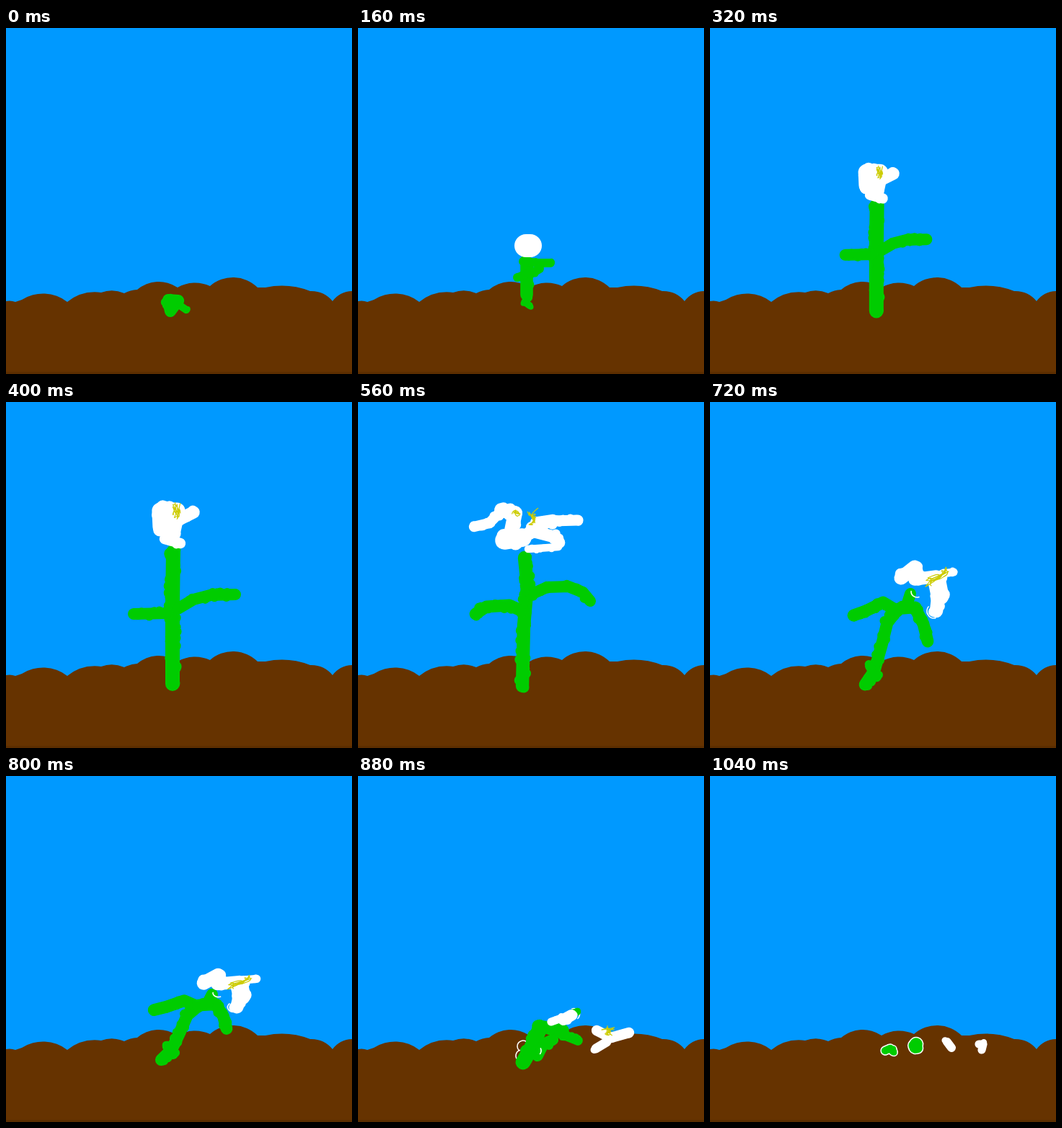
These frames come from a looping animation (480 by 480 pixels, 1.12 s). An HTML page:

```html
<!DOCTYPE html>
<html lang="en">
<head>
<meta charset="utf-8">
<title>Growing flower</title>
<style>
html, body { margin: 0; width: 100%; height: 100%; overflow: hidden; background: #09f; }
svg { display: block; width: 100vw; height: 100vh; }
path { fill: none; stroke-linecap: round; stroke-linejoin: round; vector-effect: non-scaling-stroke; }
</style>
</head>
<body>
<svg id="stage" viewBox="0 0 480 480"></svg>
<script>
const NS = "http://www.w3.org/2000/svg";
const STEP = 80;
const GREEN = "#0c0", WHITE = "#fff", YELLOW = "#cc0", SKY = "#09f", SOIL = "#630";
const stage = document.getElementById("stage");

let state = 7;
const random = () => (state = state * 16807 % 2147483647) / 2147483647;
const spread = size => (random() * 2 - 1) * size;

function make(tag, attrs, parent) {
  const node = document.createElementNS(NS, tag);
  for (const key in attrs) node.setAttribute(key, attrs[key]);
  return parent.appendChild(node);
}

const line = (stroke, width, d) => ({ d, stroke, "stroke-width": width });
const polyline = points => "M" + points.map(p => p.join(" ")).join("L");

// Round dabs scattered along the points, about one per 5 pixels.
function dabs(points, width) {
  let d = "";
  points.slice(1).forEach(([x, y], i) => {
    const [fromX, fromY] = points[i];
    const count = Math.ceil(Math.hypot(x - fromX, y - fromY) / 5);
    for (let n = 0; n <= count; n++) {
      const t = n / count;
      const dabX = fromX + (x - fromX) * t + spread(width * 0.2);
      const dabY = fromY + (y - fromY) * t + spread(width * 0.2);
      d += `M${dabX.toFixed(1)} ${dabY.toFixed(1)}h.01`;
    }
  });
  return d;
}

// A lumpy brush stroke: a smooth core with dabs along its edges.
function brush(color, width, ...points) {
  return [
    line(color, width * 0.8, polyline(points)),
    line(color, width * 0.62, dabs(points, width))
  ];
}

const green = (width, ...points) => brush(GREEN, width, ...points);
const white = (width, ...points) => brush(WHITE, width, ...points);

function outlined(width, ...points) {
  const parts = green(width, ...points);
  return [...parts.map(part => line(WHITE, part["stroke-width"] + 3, part.d)), ...parts];
}

function scribble(cx, cy, rx, ry, tilt = 0) {
  const point = () => {
    const x = spread(rx), y = spread(ry);
    return `${(cx + x).toFixed(1)} ${(cy + y + x * tilt).toFixed(1)}`;
  };
  const turns = Math.round(4 + (rx + ry) / 3);
  let d = "M" + point();
  for (let i = 0; i < turns; i++) d += `Q${point()} ${point()}`;
  return [line(YELLOW, 1.2, d)];
}

function arc(cx, cy, radius, from, to) {
  const at = a => `${cx + radius * Math.cos(a)} ${cy + radius * Math.sin(a)}`;
  return [line(WHITE, 1.6, `M${at(from)}A${radius} ${radius} 0 0 1 ${at(to)}`)];
}

// Each hill is an arc to [x, y], bulging by the given height.
function drawGround() {
  const hills = [
    [13, 380, 1], [22, 377, 0], [85, 380, 10], [132, 367, 5], [164, 368, 3], [182, 363, 1],
    [238, 360, 9.5], [283, 358, 5.5], [349, 360, 13], [360, 360, 0],
    [422, 365, 4.5], [453, 379, 4], [480, 365, 3.5]
  ];
  let x = 0, y = 379, d = "M0 379";
  for (const [endX, endY, bulge] of hills) {
    const half = Math.hypot(endX - x, endY - y) / 2;
    const radius = (half * half + bulge * bulge) / (2 * bulge);
    d += bulge ? `A${radius} ${radius} 0 0 1 ${endX} ${endY}` : `L${endX} ${endY}`;
    [x, y] = [endX, endY];
  }
  make("path", { d: d + "V480H0Z", style: `fill:${SOIL}` }, stage);
  make("rect", { y: 477, width: 480, height: 3, fill: "#5c2e00" }, stage);
}

const seed = [
  green(20, [225, 377], [239, 378], [228, 393], [225, 380]),
  green(13, [240, 384], [250, 391])
].flat();

const sprout = [
  green(22, [234, 325], [234, 370]),
  green(15, [229, 324], [250, 326], [267, 326]),
  green(15, [252, 334], [240, 341], [221, 346]),
  green(12, [231, 380], [238, 385])
].flat();

const bud = [...sprout, line(WHITE, 32, "M233 302h6")];

const flower = [
  green(25, [232, 208], [231, 280], [231, 391]),
  green(20, [238, 287], [260, 274], [283, 268], [318, 267]),
  green(20, [177, 294], [225, 293]),
  white(29, [214, 151], [237, 151], [231, 178], [215, 173], [214, 151]),
  white(22, [240, 163], [260, 153]),
  white(18, [220, 190], [242, 196]),
  scribble(236, 154, 7, 15)
].flat();

const bloom = [
  green(23, [231, 216], [235, 255], [230, 310], [228, 394]),
  green(21, [228, 290], [210, 282], [178, 284], [163, 294]),
  green(20, [240, 267], [262, 257], [292, 256], [312, 264], [322, 276]),
  white(18, [161, 173], [182, 168], [200, 150]),
  white(25, [199, 150], [218, 154], [213, 178]),
  white(32, [203, 192], [228, 188]),
  white(23, [238, 182], [250, 168], [270, 165]),
  white(19, [270, 165], [305, 164]),
  white(21, [245, 180], [272, 187], [279, 195]),
  white(13, [236, 204], [278, 201]),
  scribble(219, 155, 6, 5),
  scribble(242, 159, 9, 12)
].flat();

const wilt = [
  green(21, [215, 392], [228, 373], [238, 338], [246, 306], [260, 288]),
  green(18, [222, 366], [231, 381]),
  green(21, [199, 296], [216, 290], [240, 278], [260, 290]),
  green(21, [260, 287], [284, 285], [296, 308], [302, 332]),
  green(20, [278, 266], [272, 285]),
  white(24, [265, 244], [284, 229], [289, 245]),
  white(22, [284, 246], [314, 242]),
  white(31, [315, 249], [319, 269]),
  white(23, [316, 272], [314, 290]),
  white(14, [322, 238], [338, 236]),
  arc(287, 263, 8, 1.2, 3.2),
  arc(311, 290, 10, 1.4, 3.8),
  scribble(318, 241, 19, 8, -0.6)
].flat();

const fallen = [
  arc(229, 375, 8, 2.4, 5.2),
  arc(227, 388, 8, 2.2, 4.4),
  arc(302, 329, 8, 4, 7.5),
  green(13, [300, 329], [304, 327]),
  green(26, [229, 397], [240, 378], [252, 351]),
  green(22, [250, 347], [284, 353]),
  green(17, [280, 357], [305, 367]),
  green(20, [249, 388], [257, 372], [270, 366]),
  arc(246, 381, 8, -0.4, 0.6),
  white(14, [268, 341], [282, 336]),
  white(20, [285, 338], [296, 332]),
  white(18, [331, 353], [351, 363], [376, 356]),
  white(16, [330, 378], [345, 369]),
  scribble(346, 353, 10, 7)
].flat();

const remains = [
  outlined(13, [243, 381], [250, 378], [254, 382]),
  outlined(22, [286, 372], [285, 376]),
  white(15, [329, 369], [335, 377]),
  white(14, [373, 372], [379, 372], [377, 380])
].flat();

// Scale and lean a pose around the point where it meets the soil.
const pose = (parts, sx = 1, sy = 1, lean = 0) => ({
  parts,
  transform: `translate(230 398) matrix(${sx} 0 ${-lean} ${sy} 0 0) translate(-230 -398)`
});

const poses = [
  pose(seed),
  pose(sprout, 0.8, 0.72),
  pose(bud),
  pose(flower, 0.6, 0.58),
  pose(flower, 0.8, 0.8),
  pose(flower),
  pose(bloom, 0.9, 1.04),
  pose(bloom),
  pose(bloom, 0.82, 0.83, 0.17),
  pose(wilt),
  pose(wilt, 1, 0.72, 0.06),
  pose(fallen),
  pose(fallen, 0.96, 0.6),
  pose(remains)
];

make("rect", { width: 480, height: 480, fill: SKY }, stage);
drawGround();
const groups = poses.map(({ parts, transform }) => {
  const group = make("g", { transform, display: "none" }, stage);
  parts.forEach(part => make("path", part, group));
  return group;
});

let shown = -1;
function draw(time) {
  const index = Math.floor(Math.max(0, time) / STEP) % poses.length;
  if (index === shown) return;
  groups.forEach((group, i) => group.setAttribute("display", i === index ? "inline" : "none"));
  shown = index;
}

const start = performance.now();
function tick() {
  draw(performance.now() - start);
  requestAnimationFrame(tick);
}
tick();
</script>
</body>
</html>
```
